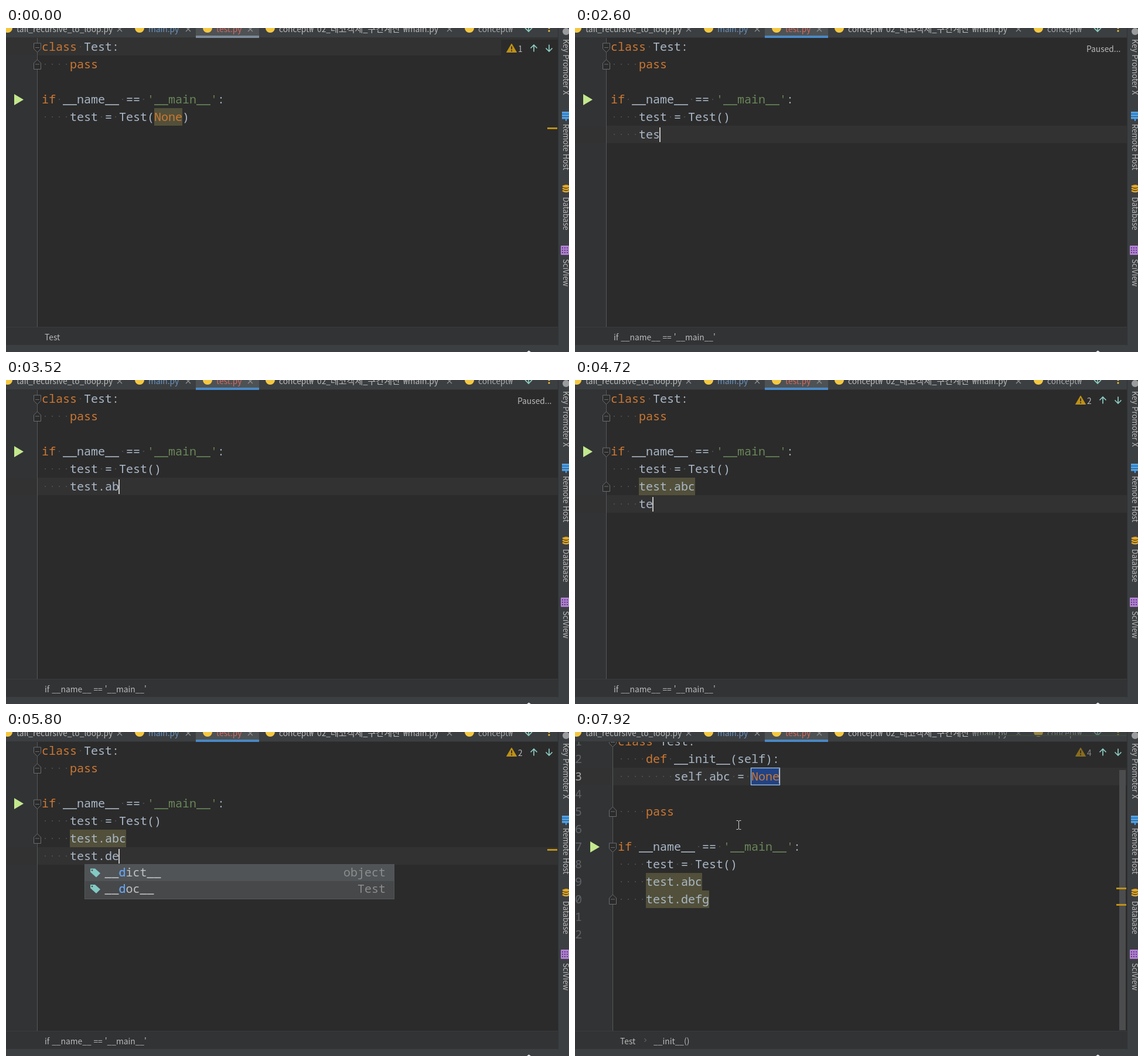
Write an HTML page that moves like this. It is 961x554 px and loops after 8 s.

```html
<!DOCTYPE html>
<html lang="ko">
<head>
<meta charset="utf-8">
<style>
  html, body { margin: 0; width: 100%; height: 100%; overflow: hidden; background: #2b2b2b; }
  svg { display: block; width: 961px; height: 554px; }
  text { white-space: pre; }
  .code { font: 20px "Noto Sans Mono", "DejaVu Sans Mono", monospace; }
  .ui { font: 13.8px "Noto Sans CJK KR", "Noto Sans CJK JP", "Noto Sans CJK", sans-serif; }
</style>
</head>
<body>
<svg id="stage" viewBox="0 0 961 554"></svg>
<script>
const LOOP = 8000, CW = 12, LH = 30;
const C = {
  text: '#a9b7c6', key: '#cc7832', str: '#6a8759', dot: '#57595b', olive: '#52503a',
  bar: '#3c3f41', gutter: '#313335', edit: '#2b2b2b', row: '#323232', ui: '#bbbbbb',
  warn: '#be9117', teal: '#8ecdc2', fold: '#6a6d70', dim: '#8c8c8c', pop: '#46484a',
  blue: '#7aa8fb', purple: '#b27fd6', tag: '#83c9c4', yellow: '#f5c842'
};

// Small drawing helpers
const esc = s => s.replace(/&/g, '&amp;').replace(/</g, '&lt;');
const rect = (x, y, w, h, fill, more = '') => `<rect x="${x}" y="${y}" width="${w}" height="${h}" fill="${fill}" ${more}/>`;
const line = (d, stroke, w = 1) => `<path d="${d}" fill="none" stroke="${stroke}" stroke-width="${w}"/>`;
const shape = (d, fill, more = '') => `<path d="${d}" fill="${fill}" ${more}/>`;
const dotAt = (x, y, r, fill) => `<circle cx="${x}" cy="${y}" r="${r}" fill="${fill}"/>`;
const text = (cls, x, y, s, fill, more = '') => `<text class="${cls}" x="${x}" y="${y}" fill="${fill}" ${more}>${esc(s)}</text>`;
const ui = (x, y, s, fill = C.ui, more = '') => text('ui', x, y, s, fill, more);
const mono = (x, y, s, fill, more = '') => text('code', x, y, s, fill, more);
const group = (x, y, body, more = '') => `<g transform="translate(${x} ${y}) ${more}">${body}</g>`;

// Last value whose time has been reached
const at = (t, steps) => steps.reduce((v, s) => t >= s[0] ? s[1] : v, steps[0][1]);
const typed = (t, word, times) => word.slice(0, times.filter(x => t >= x).length);

function codeLine(s, x0, y, bracket) {
  let out = '';
  for (const m of s.matchAll(/'[^']*'|\w+| +|[()]|[^\w\s'()]+/g)) {
    const tok = m[0], x = x0 + m.index * CW;
    if (tok[0] === ' ') {
      for (let i = 0; i < tok.length; i++) out += dotAt(x + (i + .5) * CW, y - 7, .9, C.dot);
    } else if (bracket && /[()]/.test(tok)) {
      out += rect(x, y - 22, CW, LH, '#3b514d') + mono(x, y, tok, '#ffdf28', 'font-weight="bold"');
    } else {
      const fill = tok[0] === "'" ? C.str : /^(class|def|pass|if|None)$/.test(tok) ? C.key : C.text;
      out += mono(x, y, tok, fill);
    }
  }
  return out;
}

function foldMark(x, y, up) {
  const d = up ? 'M-6 8.5V-2L0-8L6-2V8.5Z' : 'M-6-7.5H6V2L0 8L-6 2Z';
  return group(x, y, shape(d, C.edit, `stroke="${C.fold}"`) + line('M-3.5 0H3.5', C.fold));
}

const beam = (x, y) => group(x + .5, y,
  line('M-4-7.5H-1.5L0-6.5L1.5-7.5H4M0-6.5V6.5M-4 7.5H-1.5L0 6.5L1.5 7.5H4', '#d0d0d0'));

const cross = x => line(`M${x - 4}-2L${x + 4} 6M${x + 4}-2L${x - 4} 6`, '#8f9193', 1.3);
const tabIcon = x => dotAt(x, 0, 8, C.yellow);

function tabs(focus, late) {
  const last = tabIcon(791) + ui(806, 7, 'concept₩', '#a8aaac') + cross(757);
  return rect(0, 0, 961, 17, C.bar) + rect(0, 16, 942, 1, '#323232') +
    rect(324, 0, 108, 17, '#4e5254') + rect(324, 13, 108, 4, focus ? '#4a88c7' : '#7c8a99') +
    [3, 228, 344, 451].map(tabIcon).join('') + [194, 311, 417].map(cross).join('') +
    ui(18, 7, 'tail_recursive_to_loop.py') + ui(243, 7, 'main.py', '#6b93c0') +
    ui(359, 7, 'test.py', '#d5695f') + ui(466, 7, 'concept₩') + ui(531, 7, '02_') +
    ui(554, 7, '데코객체_구간계산', C.ui, 'style="font-size:15px"') +
    ui(678, 7, '₩main.py', late ? '#8e9092' : C.ui) +
    `<g opacity="${late ? .5 : 1}">${last}` +
    rect(872, 0, 70, 16, C.bar) + line('M892-6V5M886 0L892 6L898 0', C.teal, 1.7) +
    dotAt(927, 0, 1.6, C.yellow) + dotAt(927, 5, 1.6, C.yellow) + '</g>' +
    (late ? rect(690, 5, 252, 2, '#3d4a40') : '');
}

function sideBar() {
  const label = (y, s) => group(951, y, ui(0, 0, s, C.ui, 'style="font-size:13.1px"'), 'rotate(90)');
  let out = rect(942, 0, 19, 543, C.bar) + rect(942, 0, 1, 543, '#2f3133') + dotAt(956, 6, 6, '#9a9c9e');
  for (let i = 0; i < 3; i++) {
    out += rect(949, 143 + i * 4.5, 12, 3.6, '#4aa3ee') +
      line(`M950 ${270 + i * 4}Q956 ${274 + i * 4} 962 ${270 + i * 4}`, '#e5a823', 2.6);
  }
  out += shape('M950 270Q956 266 962 270Q956 274 950 270Z', '#e5a823') +
    rect(955, 155, 2, 4, '#4aa3ee') + rect(947, 372, 14, 16, C.purple, 'rx="1"');
  for (let i = 0; i < 9; i++) out += rect(949 + i % 3 * 4, 375 + (i / 3 | 0) * 4, 2, 2, '#564068');
  return out + label(19, 'Key Promoter X') + label(164, 'Remote Host') + label(289, 'Database') + label(395, 'SciView');
}

function status(note, late) {
  if (note === 'Paused...') return ui(873, 41, note);
  const arrow = (x, k) => group(x, 34.5, line('M0 6V-5.5M-5.5 0L0-5.5L5.5 0', C.teal, 1.7), `scale(1 ${k})`);
  return `<g opacity="${late ? .65 : 1}">` +
    shape('M863 27L871.5 41.5H854.5Z', C.warn, `stroke="${C.warn}" stroke-linejoin="round"`) +
    rect(862.2, 31.5, 1.8, 5, C.edit) + rect(862.2, 38, 1.8, 2, C.edit) +
    ui(874, 41, note) + '</g>' + arrow(901, 1) + arrow(927, -1);
}

// Completion popup
const icons = {
  m: shape('M8-7L14-4V3L8 6.5L2 3V-4Z', C.blue) + line('M2-4L8-1L14-4M8-1V6', '#46618f') +
     line('M-5-4H0M-4 0H0M-5 4H0', C.blue, 2),
  p: shape('M3.5 2V0L1.5-3.5A3.6 3.6 0 1 1 8.5-3.5L6.5 0V2H12V5H-2V2Z', C.purple) + rect(-2, 6.5, 14, 1.5, C.purple),
  t: shape('M-4-7H4L13 1L6 8L-4-1Z', C.tag) + dotAt(-1, -4, 1.3, C.pop),
  c: line('M-4-4H-1M1-4H6M-4 1H-1M1 1H10M-4 6H-1M1 6H11', C.purple, 2.2) + line('M9-1V-8M5.5-5L9-8.5L12.5-5', '#b5dd78', 2)
};
const allItems = [
  'm __str__(self) object', 'p par (expr)', 'p print print(expr)', 'm __init__(self) object',
  'm __new__(cls) object', 't __annotations__ object', 'c __class__ object',
  'm __delattr__(self,~name) object', 't __dict__ object', 'm __dir__(self) object',
  'm __eq__(self,~o) object', 'm __format__(self,~format_spec)'
];
const fewItems = ['t __dict__ object', 't __doc__ Test'];

function popup(y, items, few) {
  const w = few ? 528 : 526, h = few ? 60 : 349, nameX = 168.5;
  let out = rect(134.5, y + .5, w, h - 1, C.pop, 'stroke="#56595b"') + rect(135, y + 1, w - 1, 28, '#505457');
  items.forEach((item, i) => {
    const [kind, name, type = ''] = item.split(' '), cy = y + 14.5 + i * 27.55, base = cy + 6.5;
    const cut = name.indexOf('('), head = cut < 0 ? name : name.slice(0, cut);
    out += group(148, cy, icons[kind]) + mono(nameX, base, head, '#c0c2c4');
    if (cut > 0) out += mono(nameX + cut * CW, base, name.slice(cut).replace('~', ' '), C.dim);
    if (few) out += mono(nameX + 2 * CW, base, 'd', '#589df6');
    out += mono(few ? 648 : 646, base, type, C.dim, 'text-anchor="end"');
  });
  if (few) return out;
  // The footer cuts through the last row
  return out + rect(135, y + 318, w - 1, 30, C.pop) + rect(648, y + 2, 10, 115, '#616365') +
    dotAt(648, y + 329, 3, '#d9c25c');
}

const mainTest = "if __name__ == '__main__':";

// Everything shown at time t
function sceneAt(t) {
  const crumbIf = mainTest.slice(0, -1);
  if (t >= 7680) return {
    late: true, x0: 73, top: 1, edge: 64, focus: true, cur: 3, note: '4',
    lines: ['class Test:', '    def __init__(self):', '        self.abc = None', '', '    pass', '',
      mainTest, '    test = Test()', '    test.abc', '    test.defg', '', ''],
    folds: [[1, 0], [5, 1], [7, 0], [10, 1]], run: 7, marks: [267, 295],
    hot: [[9, 4, 8], [10, 4, 9]], crumb: 'Test', mouse: [279, 159]
  };
  const clicked = t >= 720, cleared = t >= 1720;
  const sixth = typed(t, 'test.abc', [2280, 2400, 2520, 2640, 3280, 3440, 3520, 3640]);
  const seventh = typed(t, 'test.defg', [4600, 4720, 4840, 4960, 5080, 5640, 5800, 5920, 6040]);
  const lines = ['class Test:', '    pass', '', mainTest, `    test = Test(${cleared ? '' : 'None'})`];
  if (t >= 2120) lines.push('    ' + sixth);
  if (t >= 4440) lines.push('    ' + seventh);
  const cur = at(t, [[0, 1], [720, 5], [2120, 6], [4440, 7]]);
  const col = cur === 7 ? 4 + seventh.length : cur === 6 ? 4 + sixth.length : at(t, [[0, 20], [1720, 16], [1880, 17]]);

  let mouse = null;
  if (t >= 120 && t < 1720) {
    const ease = k => 1 - (1 - k) ** 2;
    const a = ease(Math.min(1, (t - 120) / 400)), b = ease(Math.max(0, Math.min(1, (t - 760) / 280)));
    mouse = [518 - 239 * a - 125 * b, 523 - 364 * a - 30 * b].map(Math.round);
  }
  const folds = [[1, 0], [2, 1]];
  if (t >= 4000) folds.push([4, 0], [t >= 6400 ? 7 : 6, 1]);
  const hot = [];
  if (!clicked) hot.push([5, 16, 4]);
  if (t >= 4000) hot.push([6, 4, 8]);
  if (t >= 6400) hot.push([7, 4, 9]);
  return {
    x0: 61, top: 17, edge: 53, lines, cur, mouse, folds, hot, run: 4,
    focus: clicked && t < 7200,
    caret: clicked && t < 7200 ? [cur, col] : null,
    select: clicked && !cleared ? [5, 16, 4] : null,
    bracket: cleared && t < 2120 ? 5 : 0,
    note: at(t, [[0, '1'], [2400, 'Paused...'], [4240, '2'], [6720, '3']]),
    marks: at(t, [[0, [171]], [2120, []], [4000, [201]], [4440, []], [5080, [201]], [6400, [201, 231]]]),
    crumb: at(t, [[0, 'Test'], [720, crumbIf], [2720, ''], [2920, crumbIf]]),
    pop: at(t, [[0, ''], [3400, 'first'], [3520, ''], [5200, 'all'], [5720, 'few'], [5840, '']])
  };
}

function draw(s) {
  const rowY = n => s.top + (n - 1) * LH;
  const box = ([n, c, len], fill) => rect(s.x0 + c * CW, rowY(n), len * CW, LH, fill);
  let o = rect(0, 0, 961, 554, C.edit) + rect(0, 0, s.edge, 512, C.gutter) +
    rect(0, rowY(s.cur), 942, LH, C.row) + rect(s.edge, 17, 1, 495, '#555759');
  o += rect(845, 20, 97, 27, C.edit);
  s.hot.forEach(h => o += box(h, C.olive));
  if (s.select) o += box(s.select, '#214283');
  if (s.late) o += rect(300.5, 61.5, 49, 29, '#214283', 'stroke="#9cc3f0" stroke-width="1.3"') + rect(348, 63, 2, 25, C.ui);
  s.lines.forEach((l, i) => {
    const base = rowY(i + 1) + 22;
    o += codeLine(l, s.x0, base, s.bracket === i + 1);
    if (s.late) o += mono(12, base, String(i + 1), i + 1 === s.cur ? '#a4a3a3' : '#606366', 'text-anchor="end"');
  });
  s.folds.forEach(([n, up]) => o += foldMark(s.edge + .5, rowY(n) + (up ? 15 : 16.5), up));
  o += group(s.late ? 26 : 14, rowY(s.run) + 15.5, shape('M0-9.5L16 0L0 9.5Z', '#c3e88d'));
  if (s.caret) o += rect(s.x0 + s.caret[1] * CW - 1, rowY(s.caret[0]) + 3, 2, 25, '#c4c4c4');
  if (s.late) o += rect(929, 65, 11, 445, '#4b4c4d');
  s.marks.forEach(y => o += rect(924, y - 1, 17, 3, C.warn));
  o += status(s.note, s.late);
  o += rect(0, 511, 942, 1, '#3a3c3e') + rect(0, 512, 942, 31, C.gutter) +
    rect(0, 542, 961, 12, C.bar) + shape('M889 554L892.5 551.5L896 554Z', '#eeeeee');
  o += ui(s.late ? 77 : 66, 534, s.crumb);
  if (s.late) o += line('M118.5 524L121.5 527L118.5 530', '#77797b') + ui(134, 534, '__init__()');
  o += tabs(s.focus, s.late) + sideBar();
  if (s.pop === 'few') o += popup(226, fewItems, true);
  else if (s.pop) o += popup(s.pop === 'all' ? 226 : 196, allItems, false);
  if (s.mouse) o += beam(...s.mouse);
  return o;
}

const stage = document.getElementById('stage');
let shown = '';
function tick() {
  const markup = draw(sceneAt(Math.floor(performance.now() % LOOP / 40) * 40));
  if (markup !== shown) stage.innerHTML = shown = markup;
  requestAnimationFrame(tick);
}
tick();
</script>
</body>
</html>
```
